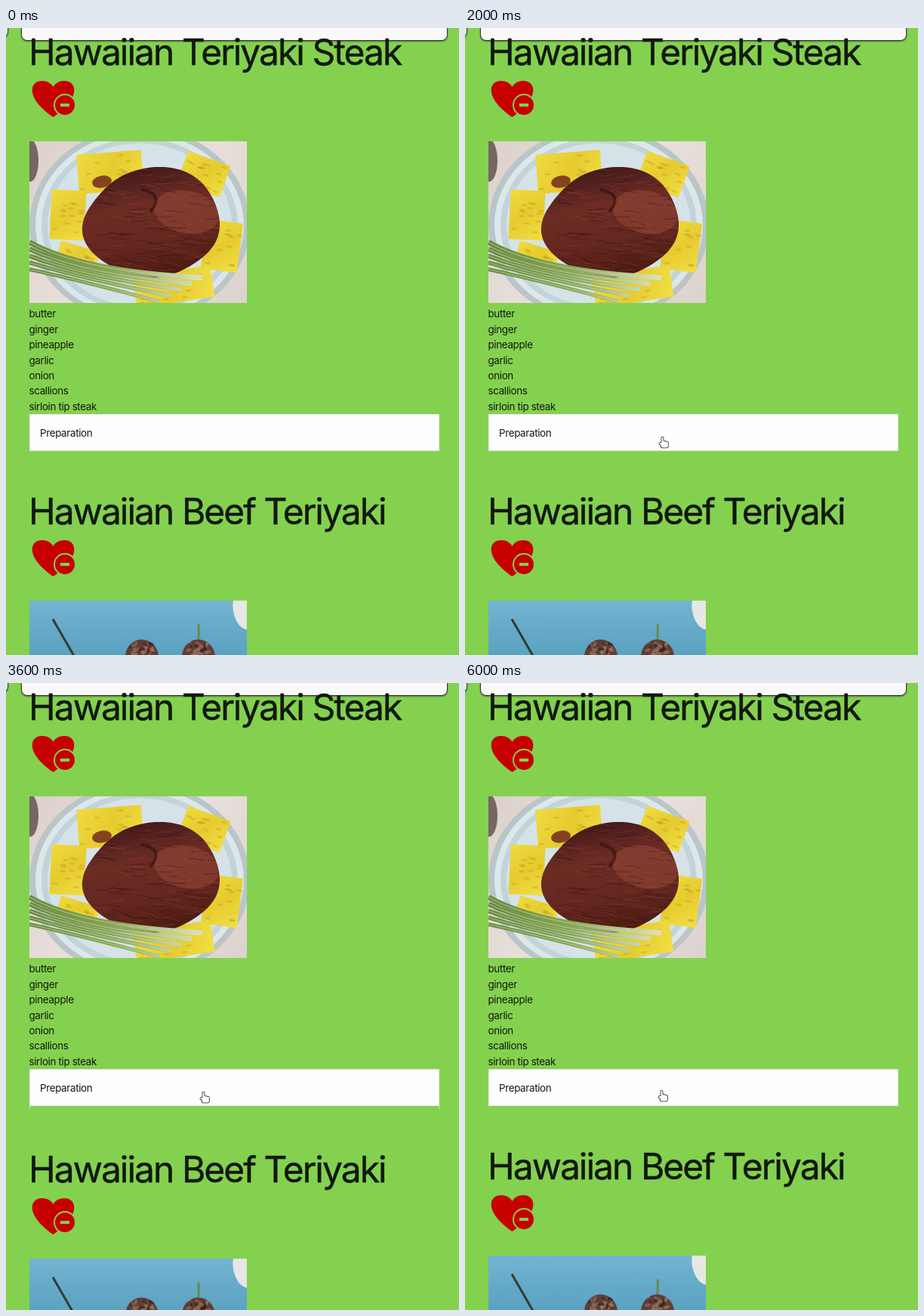
Animation, 600 px wide and 830 px high, one loop 6.2 s. Source, as an HTML page with a canvas:

```html
<!DOCTYPE html>
<html lang="en">
<head>
<meta charset="utf-8">
<title>Recipes</title>
<style>
  html, body { margin: 0; width: 100%; height: 100%; overflow: hidden; background: #84d14f; }
  #stage {
    position: relative; width: 600px; height: 830px; overflow: hidden;
    background: #84d14f; color: #12180f;
    font: 13.4px/20.4px Inter, Roboto, sans-serif;
    font-optical-sizing: none; letter-spacing: -.35px; white-space: nowrap;
  }
  #stage > *, .recipe > * { position: absolute; }
  .card {
    box-sizing: border-box; background: #f9f9f9; border: 1px solid #333;
    border-radius: 8px; box-shadow: 0 1px 2px rgba(0, 0, 0, .45);
  }
  .recipe { left: 0; top: 0; width: 600px; height: 600px; }
  h1 {
    left: 30px; top: 1.5px; margin: 0; font-size: 48px; font-weight: 400; line-height: 60px;
    letter-spacing: -2px; -webkit-text-stroke: .4px;
  }
  .heart { left: 34px; top: 69px; }
  .photo { left: 31px; top: 149.5px; width: 288px; height: 214px; }
  .list { left: 30.5px; top: 368.4px; white-space: pre; }
  .button {
    left: 31px; top: 511px; width: 543px; height: 49px; background: #fffeff;
    box-shadow: inset 0 0 0 1px rgba(0, 0, 0, .09);
  }
  .button span { position: absolute; left: 14px; top: 15px; }
  #panel {
    left: 31px; top: 560px; width: 543px; box-sizing: border-box; overflow: hidden;
    border: solid #c9dfbb; border-width: 0 1px;
  }
  #panel div { position: absolute; left: 27px; top: 49.4px; white-space: pre; }
</style>
</head>
<body>
<div id="stage">
  <div class="card" style="left:-60px;top:-40px;width:63px;height:53px"></div>
  <div class="card" style="left:20px;top:-40px;width:565px;height:57px"></div>
  <div class="recipe" id="first"></div>
  <div id="panel"><div id="steps"></div></div>
  <div class="recipe" id="second"></div>
  <canvas id="overlay" width="600" height="830"></canvas>
</div>
<script>
const LOOP = 6200, TICK = 100, GAP = 608, PANEL_HEIGHT = 340;
const CLICKS = [2010, 3150, 4150, 5500];
const TAU = Math.PI * 2;
const $ = id => document.getElementById(id);
const lerp = (a, b, k) => a + (b - a) * k;

let seed = 7;
const random = (lo, hi) => {
  seed = seed * 16807 % 2147483647;
  return lerp(lo, hi, seed / 2147483647);
};

const heart = `<svg class="heart" width="60" height="50" viewBox="34 69 60 50">
  <path fill="#c60000" d="M62.5 118C25 92 31 70 48 70Q58 70 62.5 78Q67 70 77 70C94 70 100 92 62.5 118Z"/>
  <circle cx="78" cy="102" r="14" fill="#c60000" stroke="#84d14f" stroke-width="2"/>
  <rect x="72" y="100" width="12" height="4" fill="#84d14f"/>
</svg>`;

function fillRecipe(id, title, items) {
  $(id).innerHTML = `<h1>${title}</h1>${heart}
    <canvas class="photo" width="288" height="214"></canvas>
    <div class="list">${items.join('\n')}</div>
    <div class="button"><span>Preparation</span></div>`;
  return $(id).querySelector('canvas').getContext('2d');
}

function gradient(g, x0, y0, x1, y1, ...colors) {
  const fill = g.createLinearGradient(x0, y0, x1, y1);
  colors.forEach((c, i) => fill.addColorStop(i / (colors.length - 1), c));
  return fill;
}

function ellipse(g, color, x, y, rx, ry, turn = 0) {
  g.fillStyle = color;
  g.beginPath();
  g.ellipse(x, y, rx, ry, turn, 0, TAU);
  g.fill();
}

function curve(g, color, width, x0, y0, cx, cy, x1, y1) {
  g.strokeStyle = color;
  g.lineWidth = width;
  g.beginPath();
  g.moveTo(x0, y0);
  g.quadraticCurveTo(cx, cy, x1, y1);
  g.stroke();
}

function pineapple(g, x, y, w, h, turn) {
  g.save();
  g.translate(x, y);
  g.rotate(turn);
  g.fillStyle = gradient(g, -w / 2, -h / 2, w / 2, h / 2, '#efdb40', '#e6cb2e', '#f1df46');
  g.fillRect(-w / 2, -h / 2, w, h);
  for (let i = 0; i < 14; i++) {
    ellipse(g, 'rgba(176,128,20,.25)', random(-.45, .45) * w, random(-.45, .45) * h, 4, 1.5);
  }
  g.restore();
}

function steak(g, x, y) {
  g.beginPath();
  for (let a = 0; a < TAU; a += .05) {
    const dent = Math.max(0, Math.cos(a + TAU * 3 / 8)) ** 4;
    const r = 1.02 - .14 * dent + .015 * Math.sin(5 * a);
    g.lineTo(x + 90 * r * Math.cos(a), y + 73 * r * Math.sin(a));
  }
  g.fillStyle = gradient(g, x, y - 75, x + 30, y + 75, '#43191a', '#6c2c24', '#64271f', '#48190f');
  g.fill();
  g.save();
  g.clip();
  ellipse(g, 'rgba(150,74,56,.55)', x + 48, y - 12, 44, 28, .2);
  for (let i = 0; i < 150; i++) {
    const px = x + random(-90, 80), py = y + random(-73, 73);
    const color = i % 2 ? 'rgba(40,12,10,.3)' : 'rgba(165,85,66,.22)';
    curve(g, color, 1.3, px, py, px + 13, py + 1, px + 22, py + random(-4, 7));
  }
  curve(g, 'rgba(46,16,13,.6)', 4, x - 12, y - 42, x + 20, y - 35, x, y - 12);
  g.restore();
}

function drawDinner(g) {
  g.translate(-31, -149.5);
  g.fillStyle = gradient(g, 31, 149, 318, 363, '#ddd0ca', '#e8e0dc', '#dcd3ce');
  g.fillRect(31, 149, 289, 215);
  ['#b9c5c8', '#dce7ea', '#c3d3d9', '#d5e3e8'].forEach((color, i) =>
    ellipse(g, color, 177, 260, 146 - 8 * i, 129 - 7 * i));
  ellipse(g, '#766760', 32, 175, 11, 28);

  pineapple(g, 138, 190, 86, 52, -.08);
  pineapple(g, 262, 193, 60, 44, .35);
  pineapple(g, 82, 247, 46, 66, .05);
  pineapple(g, 286, 288, 48, 66, .13);
  pineapple(g, 222, 342, 104, 42, -.15);
  pineapple(g, 95, 302, 54, 28, .3);
  ellipse(g, '#84431f', 127, 203, 13, 8, -.2);
  steak(g, 191, 255);

  const leaf = gradient(g, 31, 0, 255, 0, '#67883e', '#86a558', '#dbe2b9');
  for (let i = 0; i < 5; i++) {
    const path = [31, 283 + 9 * i, 100, 322 + 3 * i, 260 - 14 * i, 330 + 8 * i];
    curve(g, leaf, 7 - .5 * i, ...path);
    curve(g, 'rgba(205,220,160,.5)', 1.5, ...path);
  }
}

function drawSkewers(g) {
  g.translate(-31, -757.5);
  g.fillStyle = gradient(g, 31, 757, 31, 840, '#74b4d1', '#64a9c8', '#589fbe');
  g.fillRect(31, 757, 289, 215);
  ellipse(g, '#e5e8e5', 316, 770, 15, 26, -.2);
  curve(g, '#343b30', 3, 62, 782, 74, 803, 92, 834);
  curve(g, '#668a50', 3, 255, 789, 256, 800, 254, 818);
  for (const x of [180, 255]) {
    ellipse(g, '#5d3d34', x, 832, 22, 23, -.1);
    for (let i = 0; i < 24; i++) {
      const color = i % 3 ? 'rgba(185,145,120,.4)' : 'rgba(45,22,18,.5)';
      ellipse(g, color, x + random(-14, 14), random(814, 830), 4, 2, random(0, 3));
    }
  }
}

function ease(x) {
  x = Math.min(1, Math.max(0, x));
  const bezier = (s, a, b) => 3 * (1 - s) ** 2 * s * a + 3 * (1 - s) * s * s * b + s ** 3;
  let lo = 0, hi = 1;
  for (let i = 0; i < 24; i++) {
    const m = (lo + hi) / 2;
    if (bezier(m, .25, .25) < x) lo = m; else hi = m;
  }
  return x === 0 || x === 1 ? x : bezier(lo, .1, 1);
}

const arrow = new Path2D('M0 0V11.5L2.7 9L4.6 13L6.7 12L5 8.2H8.5Z');
const hand = new Path2D();
hand.roundRect(-2.6, -1.4, 2.2, 10, 1.1);
for (let i = 0; i < 3; i++) hand.roundRect(-.4 + 2.1 * i, 3.6 + .6 * i, 2.1, 6, 1);
hand.roundRect(-5.6, 6, 3.6, 2.4, 1.1);
hand.roundRect(-3.4, 6.5, 9.3, 6, 2);

function drawCursor(g, t) {
  if (t < 400) return;
  const enter = ease((t - 300) / 700), down = ease((t - 1300) / 400), late = t >= 4000;
  const x = lerp(lerp(310, 264, enter), 263, down) - (late ? 1 : 0);
  const y = lerp(lerp(830, 482, enter), 543, down) - (late ? 2 : 0);
  const overButton = y > 511 && y < 560;
  const shape = overButton ? hand : arrow;
  g.save();
  g.translate(x, y);
  g.strokeStyle = overButton ? '#222' : '#fff';
  g.fillStyle = overButton ? '#fff' : '#111';
  g.lineWidth = 1.6;
  g.stroke(shape);
  g.fill(shape);
  g.restore();
}

function drawRing(g, t) {
  for (const c of CLICKS) {
    const age = t - c;
    if (age <= 0 || age >= 280) continue;
    g.globalAlpha = Math.min(1, (280 - age) / 110);
    g.strokeStyle = 'rgba(203,66,60,.7)';
    g.lineWidth = 4;
    g.beginPath();
    g.arc(262, 543, 29.8, 0, TAU);
    g.stroke();
    g.globalAlpha = 1;
  }
}

drawDinner(fillRecipe('first', 'Hawaiian Teriyaki Steak',
  ['butter', 'ginger', 'pineapple', 'garlic', 'onion', 'scallions', 'sirloin tip steak']));
drawSkewers(fillRecipe('second', 'Hawaiian Beef Teriyaki', []));
$('steps').textContent = `1. Combine all ingredients in a resealable plastic bag. Squeeze out as much air as
possible and marinate the steak in the refrigerator at least 8 hours or overnight.

2. Remove the meat from the marinade and place on the grill. Grill to desired
temperature; medium-rare is best.

3. Core and slice a fresh pineapple into 1/4-inch rectangles. Melt 3 tablespoons
of butter.

4. Place pineapple rafts on the grill and brush with melted butter. Grill until warm,
with nice grill marks.`;

const overlay = $('overlay').getContext('2d');

function render(now) {
  const t = Math.floor(now % LOOP / TICK) * TICK;
  // Each click toggles the panel
  const open = CLICKS.reduce((sum, c, i) => sum + (i % 2 ? -1 : 1) * ease((t - c - 150) / 350), 0);
  const height = open * PANEL_HEIGHT;
  $('panel').style.height = height + 'px';
  $('second').style.transform = `translateY(${GAP + height}px)`;
  overlay.clearRect(0, 0, 600, 830);
  drawCursor(overlay, t);
  drawRing(overlay, t);
}

const start = performance.now();
function loop() {
  render(performance.now() - start);
  requestAnimationFrame(loop);
}
loop();
</script>
</body>
</html>
```
